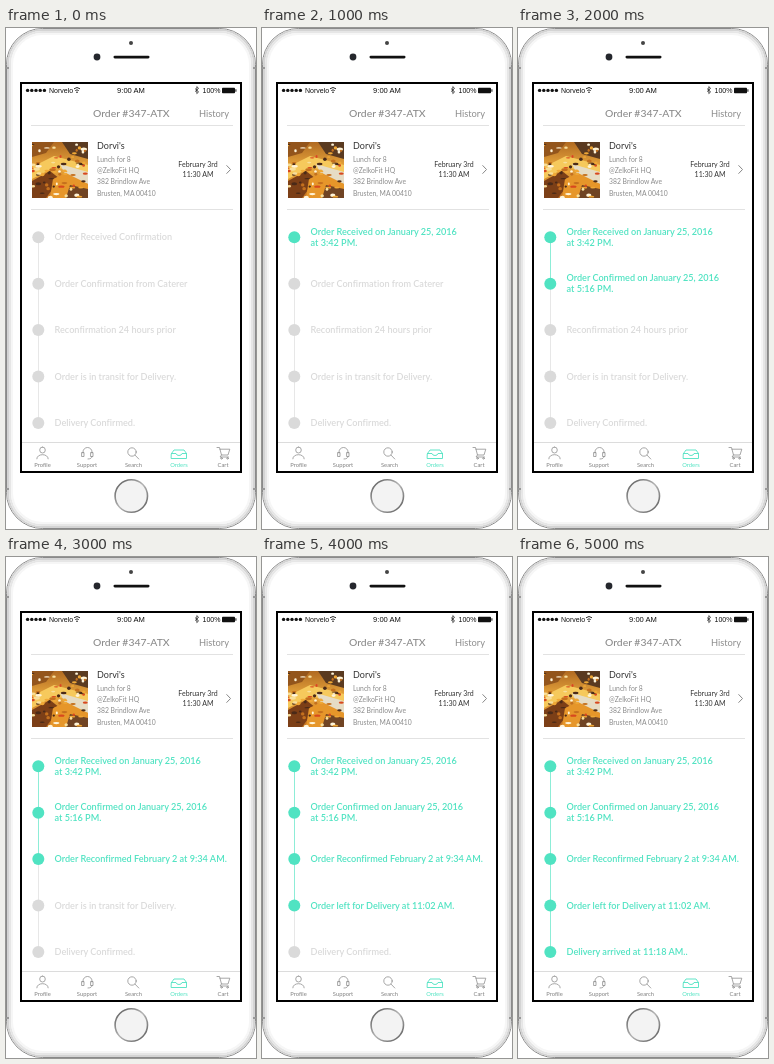
Animation of 250 by 501 pixels, one loop 6000 ms. Source, as an HTML page:

```html
<!DOCTYPE html>
<html lang="en">
<head>
<meta charset="utf-8">
<title>Order tracker</title>
<style>
  html, body { margin: 0; width: 100%; height: 100%; overflow: hidden; background: #fff; }
  svg { display: block; width: 250px; height: 501px; font-family: Lato, sans-serif; font-variant-ligatures: none; }
  .system { font-family: "Liberation Sans", Arial, sans-serif; font-size: 7px; fill: #111; }
  .small { font-size: 6.8px; fill: #8c8c8c; }
  .mid { text-anchor: middle; }
  .rule { stroke: #e2e2e2; }
  .icon { fill: none; stroke: #8a8a8a; stroke-width: .75; stroke-linecap: round; stroke-linejoin: round; }
  .tab { font-size: 5.8px; fill: #808080; text-anchor: middle; }
  .step { font-size: 9.15px; font-weight: 600; }
</style>
</head>
<body>
<svg viewBox="0 0 250 501">
  <defs>
    <linearGradient id="ring" x2="1" y2="1">
      <stop stop-color="#555"/><stop offset=".5" stop-color="#b5b5b5"/><stop offset="1" stop-color="#555"/>
    </linearGradient>
    <linearGradient id="food" x2="0" y2="1">
      <stop stop-color="#b06a22"/><stop offset=".45" stop-color="#e8a63c"/><stop offset="1" stop-color="#c4701e"/>
    </linearGradient>
    <clipPath id="thumb"><path d="M26 114h56v56H26z"/></clipPath>
  </defs>

  <!-- Handset -->
  <g fill="#fff" stroke-width="2">
    <rect x=".5" y=".5" width="249" height="500" rx="36" stroke="#8a8a8a" stroke-width="1"/>
    <rect x="2" y="2" width="246" height="497" rx="34.5" stroke="#d4d4d4"/>
    <rect x="4" y="4" width="242" height="493" rx="32.5" stroke="#e6e6e6"/>
    <rect x="6" y="6" width="238" height="489" rx="30.5" stroke="#f6f6f6"/>
  </g>
  <path d="M0 40h3M247 40h3M0 461h3M247 461h3" stroke="#999" stroke-width="2"/>
  <circle cx="125" cy="15" r="2" fill="#444"/>
  <circle cx="91" cy="29" r="3.4" fill="#25272d"/>
  <rect x="107.5" y="27.8" width="36" height="2.6" rx="1.3" fill="#111"/>
  <circle cx="125.3" cy="468" r="16.2" fill="#f3f3f3" stroke="url(#ring)" stroke-width="1.6"/>
  <rect x="15" y="55" width="220" height="389" fill="#fff" stroke="#000" stroke-width="2"/>

  <!-- Status bar -->
  <g class="system">
    <g id="signal"></g>
    <text x="43" y="65">Norvelo</text>
    <path d="M68 60.8q3-2.6 6 0M69.3 62.6q1.7-1.5 3.4 0" fill="none" stroke="#111" stroke-width=".9"/>
    <circle cx="71" cy="64.3" r=".8"/>
    <text class="mid" x="125" y="65" font-size="7.6">9:00 AM</text>
    <path d="M189 60.5l3.6 3.4-1.8 1.7v-7l1.8 1.7-3.6 3.4" fill="none" stroke="#111" stroke-width=".7"/>
    <text x="196.5" y="65">100%</text>
    <rect x="216" y="59.8" width="13" height="5.4" rx=".8"/>
    <path d="M229.4 61.3h1v2.4h-1z"/>
  </g>

  <!-- Header and order card -->
  <text class="mid" x="125.3" y="89" font-size="10.4" font-weight="500" fill="#8c8c8c">Order #347-ATX</text>
  <text x="193" y="89" font-size="9.3" fill="#8c8c8c">History</text>
  <path class="rule" d="M25 97.5H227M25 181.5H227"/>
  <g clip-path="url(#thumb)">
    <path d="M26 114h56v56H26z" fill="url(#food)"/>
    <path d="M26 114h22l-8 11-14 4z" fill="#93551c"/>
    <path d="M56 114h26v17l-18-5z" fill="#5a3a20"/>
    <path d="M26 139l22-11 34 9v11l-33-9-23 12z" fill="#f6c95c"/>
    <path d="M54 136l28 8v12l-22-8z" fill="#e6dcc4"/>
    <path d="M26 153l18-10 10 8-14 19H26z" fill="#7c3f17"/>
    <path d="M47 151l13-6 22 11v14H44z" fill="#e6962a"/>
    <path d="M64 157l18 4v9H60z" fill="#704424"/>
    <g id="bites"></g>
  </g>
  <text x="91" y="120.5" font-size="9" fill="#333">Dorvi's</text>
  <g class="small">
    <text x="91" y="134">Lunch for 8</text>
    <text x="91" y="145.2">@ZelkoFit HQ</text>
    <text x="91" y="156.4">382 Brindlow Ave</text>
    <text x="91" y="167.6">Brusten, MA 00410</text>
  </g>
  <g class="mid" font-size="7" fill="#333">
    <text x="192" y="138.5">February 3rd</text>
    <text x="192" y="149">11:30 AM</text>
  </g>
  <path d="M220.5 137.3l4 4.2-4 4.2" fill="none" stroke="#888"/>

  <g id="timeline"></g>

  <!-- Tab bar -->
  <path d="M16 414.5H234" stroke="#dcdcdc"/>
  <g class="icon">
    <path d="M36.5 419a2.8 3 0 1 1 0 6a2.8 3 0 1 1 0-6M30.8 430.8c0-5.6 11.4-5.6 11.4 0"/>
    <path d="M77 425v-1a4.5 4.5 0 0 1 9 0v1M76 424.5h2v4h-2zM85 424.5h2v4h-2zM86 428.5q0 2.5-4 2.5"/>
    <circle cx="126" cy="424" r="4.2"/><path d="M129.1 427.2l3.7 3.8"/>
    <path d="M211 419.5h2.5l2 7.5h6.5l1.8-5.8h-9.8M215.5 427l-1.5 2h8.5"/>
    <circle cx="215.5" cy="430.3" r=".8"/><circle cx="221.5" cy="430.3" r=".8"/>
    <path stroke="#50e3c2" stroke-width=".9" d="M165.5 425.5l2.5-3.5h10l2.5 3.5v5h-15zM165.5 425.5h4.5q.5 2 3 2t3-2h4.5"/>
  </g>
  <g id="tabs"></g>
</svg>

<script>
const TEAL = '#50e3c2', GREY = '#dadada', STEP_MS = 1000;
const STEPS = [
  ['Order Received Confirmation', 'Order Received on January 25, 2016', 'at 3:42 PM.'],
  ['Order Confirmation from Caterer', 'Order Confirmed on January 25, 2016', 'at 5:16 PM.'],
  ['Reconfirmation 24 hours prior', 'Order Reconfirmed February 2 at 9:34 AM.'],
  ['Order is in transit for Delivery.', 'Order left for Delivery at 11:02 AM.'],
  ['Delivery Confirmed.', 'Delivery arrived at 11:18 AM..']
];
const TABS = [['Profile', 36.5], ['Support', 81], ['Search', 127.5], ['Orders', 173], ['Cart', 217]];
const byId = id => document.getElementById(id);

function add(parent, tag, attrs, text = '') {
  const node = document.createElementNS('http://www.w3.org/2000/svg', tag);
  for (const key in attrs) node.setAttribute(key, attrs[key]);
  node.textContent = text;
  return parent.appendChild(node);
}

for (let i = 0; i < 5; i++) add(byId('signal'), 'circle', { cx: 21.6 + i * 4.2, cy: 62.4, r: 1.7 });
for (const [label, x] of TABS) {
  const node = add(byId('tabs'), 'text', { class: 'tab', x, y: 439.3 }, label);
  if (label === 'Orders') node.style.fill = TEAL;
}

let seed = 11;
const random = () => (seed = seed * 16807 % 2147483647) / 2147483647;
const tones = ['#f8df9c', '#f0a836', '#c4701e', '#4a2a18', '#fff4d8', '#d8481e'];
for (let i = 0; i < 70; i++) {
  add(byId('bites'), 'ellipse', {
    cx: 26 + random() * 56, cy: 116 + random() * 54,
    rx: 1 + random() * 2.2, ry: .6 + random() * 1.1,
    fill: tones[Math.floor(random() * tones.length)]
  });
}

const timeline = byId('timeline');
const dotY = i => 209.3 + i * 46.4;
const links = STEPS.slice(1).map((_, i) =>
  add(timeline, 'path', { d: `M32.5 ${dotY(i)}V${dotY(i + 1)}`, 'stroke-opacity': .65 }));
const rows = STEPS.map(([pending, ...done], i) => {
  const y = dotY(i);
  const dot = add(timeline, 'circle', { cx: 32.3, cy: y, r: 6 });
  const label = (lines, fill) => {
    const group = add(timeline, 'g', { class: 'step', fill });
    const first = lines.length > 1 ? y - 2.4 : y + 3.1;
    lines.forEach((line, n) => add(group, 'text', { x: 48.5, y: first + n * 10.8 }, line));
    return group;
  };
  return { dot, pending: label([pending], GREY), done: label(done, TEAL) };
});

function show(count) {
  rows.forEach(({ dot, pending, done }, i) => {
    const complete = i < count;
    dot.setAttribute('fill', complete ? TEAL : GREY);
    pending.style.display = complete ? 'none' : '';
    done.style.display = complete ? '' : 'none';
  });
  links.forEach((link, i) => link.setAttribute('stroke', i + 1 < count ? TEAL : GREY));
}

const start = performance.now();
function tick() {
  show(Math.floor((performance.now() - start) / STEP_MS) % (STEPS.length + 1));
  requestAnimationFrame(tick);
}
tick();
</script>
</body>
</html>
```
